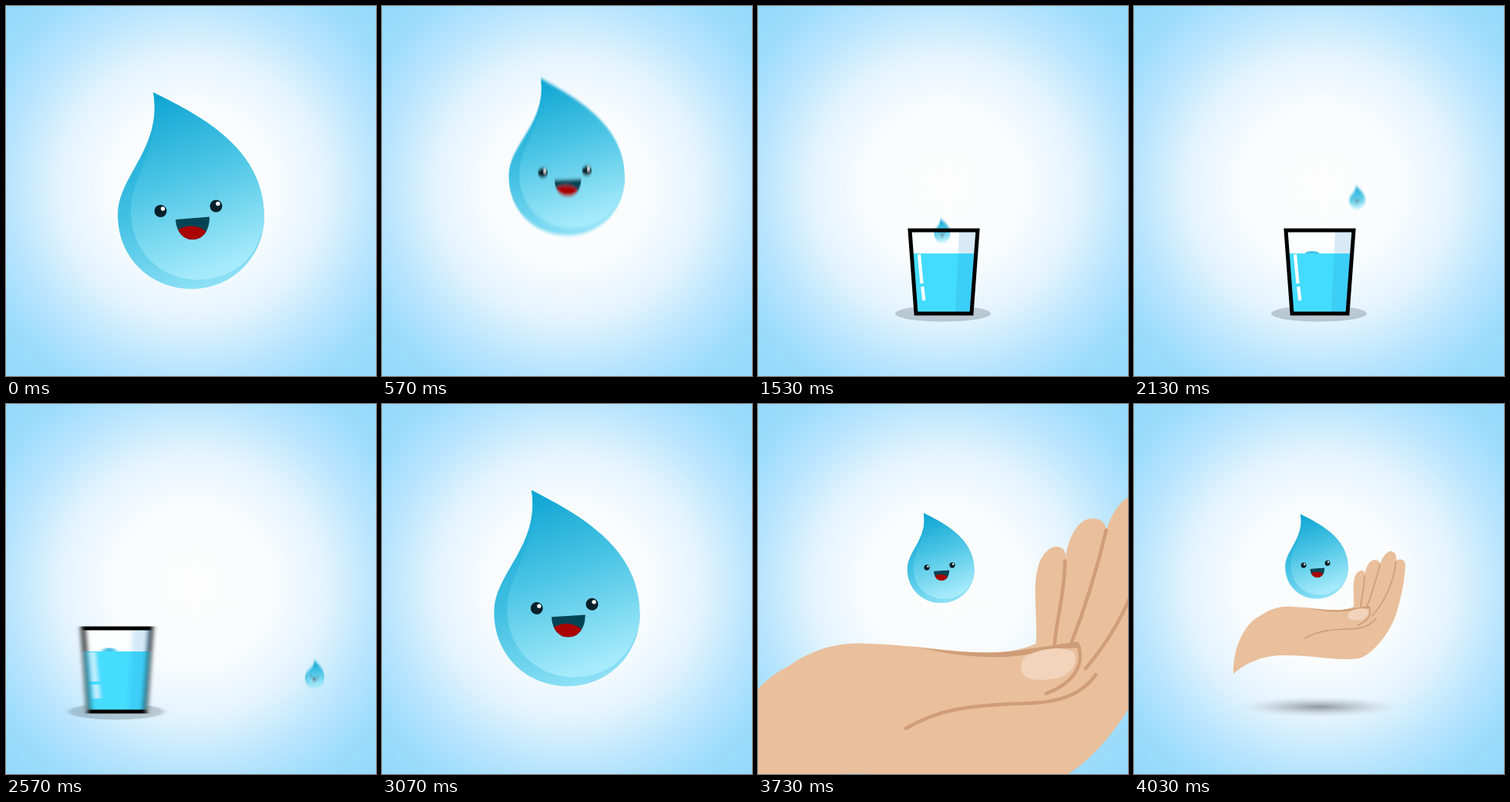
Recreate the animation shown at these times as an HTML page. Size 480 by 480 pixels, loop 5.01 s.

```html
<!DOCTYPE html>
<html lang="en">
<head>
<meta charset="utf-8">
<title>Water drop</title>
<style>
  html, body { margin: 0; width: 100%; height: 100%; overflow: hidden; background: #fff; }
  svg { display: block; width: 100vw; height: 100vh; }
</style>
</head>
<body>
<svg viewBox="0 0 480 480" xmlns="http://www.w3.org/2000/svg">
  <defs>
    <radialGradient id="sky" gradientUnits="userSpaceOnUse" cx="242" cy="235" r="340">
      <stop offset="0" stop-color="#fdfdfd"/>
      <stop offset=".3" stop-color="#fafcfd"/>
      <stop offset=".5" stop-color="#e4f4fe"/>
      <stop offset=".7" stop-color="#b9e5fd"/>
      <stop offset=".86" stop-color="#9ddcfd"/>
      <stop offset="1" stop-color="#96d9fb"/>
    </radialGradient>
    <linearGradient id="rimTone" gradientUnits="userSpaceOnUse" x1="195" y1="120" x2="280" y2="355">
      <stop offset="0" stop-color="#12a7d4"/>
      <stop offset=".5" stop-color="#3fbfe2"/>
      <stop offset="1" stop-color="#8ce0f6"/>
    </linearGradient>
    <linearGradient id="bodyTone" gradientUnits="userSpaceOnUse" x1="195" y1="120" x2="275" y2="342">
      <stop offset="0" stop-color="#10a6d4"/>
      <stop offset=".45" stop-color="#4cc5e5"/>
      <stop offset="1" stop-color="#a6ebfb"/>
    </linearGradient>
    <radialGradient id="ground">
      <stop offset="0" stop-color="#7f868b" stop-opacity=".85"/>
      <stop offset=".45" stop-color="#9aa2a8" stop-opacity=".5"/>
      <stop offset="1" stop-color="#b8c6d0" stop-opacity="0"/>
    </radialGradient>
    <clipPath id="mouth"><path d="M220 277L264 273.500C264 292 255 303 242 303C229 303 221 292 220 277Z"/></clipPath>
    <filter id="dropBlur" filterUnits="userSpaceOnUse" x="-100" y="-100" width="680" height="680"><feGaussianBlur/></filter>
    <filter id="glassBlur" filterUnits="userSpaceOnUse" x="-100" y="-100" width="680" height="680"><feGaussianBlur/></filter>
    <filter id="handBlur" filterUnits="userSpaceOnUse" x="-100" y="-100" width="680" height="680"><feGaussianBlur/></filter>
  </defs>

  <rect width="480" height="480" fill="url(#sky)"/>

  <g id="handLayer"><g id="hand">
    <ellipse cx="240" cy="393" rx="104" ry="13" fill="url(#ground)"/>
    <path fill="#e9bf9c" d="M129 350C128 318 142 285 165 274C178 265 190 262 205 263C230 264 246 267.300 262 267.300C272 267.300 279 265.500 285 263
      C286 250 283 236 286 226C288 218 294 214 298 217Q300 219 299 223C300 215 303 206 309 203C315 201 319 204 319 208
      C322 199 327 191 334 191C340 192 341 199 340 204C345 199 352 202 352 209C351 231 347 248 342 266
      C335 293 315 318 299 327C293 331 286 331 275 331C250 331 222 325 190 326C166 327 144 336 129 350Z"/>
    <path fill="#cf9d78" d="M229 264.900C240 266.500 252 267.300 262 267.300C275 267.300 290 264 305 262L307 265C295 265 285 267.500 277 268.800C262 270.500 246 269 229 264.900Z"/>
    <g fill="none" stroke="#cf9d78" stroke-width="1.7" stroke-linecap="round">
      <path d="M299 223C299 238 295 251 294 263"/>
      <path d="M319 208C314 229 309 245 302 263"/>
      <path d="M340 204C337 230 327 254 309 275"/>
      <path d="M305 263C309 272 304 282 290 287"/>
      <path d="M222 304C239 294 255 293 274 292C294 292 306 289 314 278"/>
    </g>
    <path fill="#f2d3bb" d="M280 269C288 265 298 264 303 267C306 271 303 278 294 280C286 281 279 281 278 276Q277 272 280 269Z"/>
  </g></g>

  <g id="glassBack">
    <ellipse cx="240" cy="399" rx="62" ry="10.5" fill="#46525c" fill-opacity=".27"/>
    <path d="M197 291H285L277 399H205Z" fill="#fdfeff"/>
  </g>

  <g id="dropLayer"><g id="drop">
    <path fill="url(#rimTone)" d="M191 112C242 138 335 180 335 273C335 325 294 367 241 367C187 367 145 326 145 271C145 220 203 185 191 112Z"/>
    <path fill="url(#bodyTone)" d="M191 112C242 138 335 180 335 273C335 284 333 292 330 299C318 335 286 355 249 355C199 355 162 317 162 266C162 220 204 185 191 112Z"/>
    <g fill="#07212b"><circle cx="200.500" cy="266" r="8"/><circle cx="272.500" cy="259.500" r="8"/></g>
    <g fill="#fff"><circle cx="203.500" cy="263" r="2.700"/><circle cx="275" cy="256.500" r="2.700"/></g>
    <g clip-path="url(#mouth)">
      <rect x="215" y="270" width="55" height="40" fill="#044455"/>
      <ellipse cx="240" cy="301" rx="23" ry="15.500" fill="#a90303"/>
    </g>
  </g></g>

  <g id="glassFront">
    <ellipse id="ripple" cx="231" cy="321" rx="9" fill="#43bfe2"/>
    <path d="M199.200 321H282.800L277 399H205Z" fill="#44dcfe"/>
    <path d="M261 291H285L277 399H256Z" fill="#1c86d0" fill-opacity=".16"/>
    <path d="M209 322L212.500 360M213.300 364L215.300 382" stroke="#fff" stroke-width="4.200"/>
    <path d="M197 291H285L277 399H205Z" fill="none" stroke="#000" stroke-width="5"/>
  </g>
</svg>
<script>
const LOOP = 5010, END = 4030, FRAME = 33;
const $ = id => document.getElementById(id);

const progress = (t, from, to) => Math.min(1, Math.max(0, (t - from) / (to - from)));
const inOut = p => p < .5 ? 2 * p * p : 1 - 2 * (1 - p) ** 2;
const bump = (t, from, to) => Math.sin(Math.PI * progress(t, from, to));
const mix = (a, b, e) => Object.fromEntries(Object.keys(a).map(k => [k, a[k] + (b[k] - a[k]) * e]));

const HOME = { x: 240, y: 270, scale: 1, tilt: 0 };
const APEX = { x: 239, y: 60, scale: .11, tilt: 10 };
const LANDED = { x: 400.5, y: 355, scale: .132, tilt: 17 };
const BACK = { x: 240, y: 269.7, scale: .995, tilt: 1 };
const HELD = { x: 237, y: 211, scale: .43, tilt: 0 };

const JUMP = 310, FALL = 1070, DIVE = 1600, HOP = 2010, LAND = 2570, RETURN = 3070, SETTLE = 3140;

function dropPose(t) {
  if (t < FALL) {
    const pose = mix(HOME, APEX, inOut(progress(t, JUMP, FALL)));
    pose.scale += .04 * bump(t, 0, JUMP);
    return pose;
  }
  if (t < HOP) return { ...APEX, y: APEX.y + .00111 * (t - FALL) ** 2 };
  if (t < LAND) {
    const p = progress(t, HOP, LAND);
    return {
      x: 244 + (LANDED.x - 244) * p ** .8,
      y: 213 + .0017 * (t - 2281) ** 2,
      scale: .1 + .032 * p,
      tilt: 10 + 7 * p
    };
  }
  if (t < SETTLE) return mix(LANDED, BACK, inOut(progress(t, LAND, RETURN)));
  return mix(BACK, HELD, inOut(progress(t, SETTLE, 3840)));
}

const glassX = t => -.001237 * Math.max(0, t - 2290) ** 2;
const glassY = t => 200 * (1 - progress(t, 930, 1300)) ** 2;

// How far a value travels during one frame.
const travel = (f, t) => Math.abs(f(t + FRAME / 2) - f(t - FRAME / 2));

function show(id, on) {
  $(id).style.display = on ? '' : 'none';
}

function blur(name, targets, x, y) {
  const on = Math.max(x, y) > .6;
  if (on) $(name).firstElementChild.setAttribute('stdDeviation', x + ' ' + y);
  for (const id of targets) {
    if (on) $(id).setAttribute('filter', `url(#${name})`);
    else $(id).removeAttribute('filter');
  }
}

function drawDrop(t) {
  const { x, y, scale, tilt } = dropPose(t);
  $('drop').setAttribute('transform',
    `translate(${x} ${y}) rotate(${tilt}) scale(${scale}) translate(-240 -270)`);
  show('dropLayer', t < DIVE || t >= HOP);
  blur('dropBlur', ['dropLayer'],
    Math.min(1, travel(u => dropPose(u).x, t) * .1),
    Math.min(2, travel(u => dropPose(u).y, t) * .18));
}

function drawGlass(t) {
  const parts = ['glassBack', 'glassFront'];
  for (const id of parts) {
    show(id, t > 930 && t < 2830);
    $(id).setAttribute('transform', `translate(${glassX(t)} ${glassY(t)})`);
  }
  $('ripple').setAttribute('ry', Math.max(0, 7 * bump(t, 1580, 1850) + 6 * bump(t, 1990, 2800)));
  blur('glassBlur', parts, travel(glassX, t) * .15, travel(glassY, t) * .12);
}

// The hand zooms out exponentially while it rises into place.
function drawHand(t) {
  const left = (END - t) / 560;
  const scale = 6.3 ** left, y = 265 + 139.5 * left ** 1.6;
  show('handLayer', t > 3170);
  $('hand').setAttribute('transform', `translate(240 ${y}) scale(${scale}) translate(-240 -265)`);
  const soft = Math.min(1.5, (scale - 1) * .25);
  blur('handBlur', ['handLayer'], soft, soft);
}

// The picture advances three times every 100 ms.
function quantize(t) {
  const part = t % 100;
  return t - part + (part >= 70 ? 70 : part >= 30 ? 30 : 0);
}

function draw() {
  const t = Math.min(END, quantize(performance.now() % LOOP));
  drawDrop(t);
  drawGlass(t);
  drawHand(t);
  requestAnimationFrame(draw);
}
draw();
</script>
</body>
</html>
```
